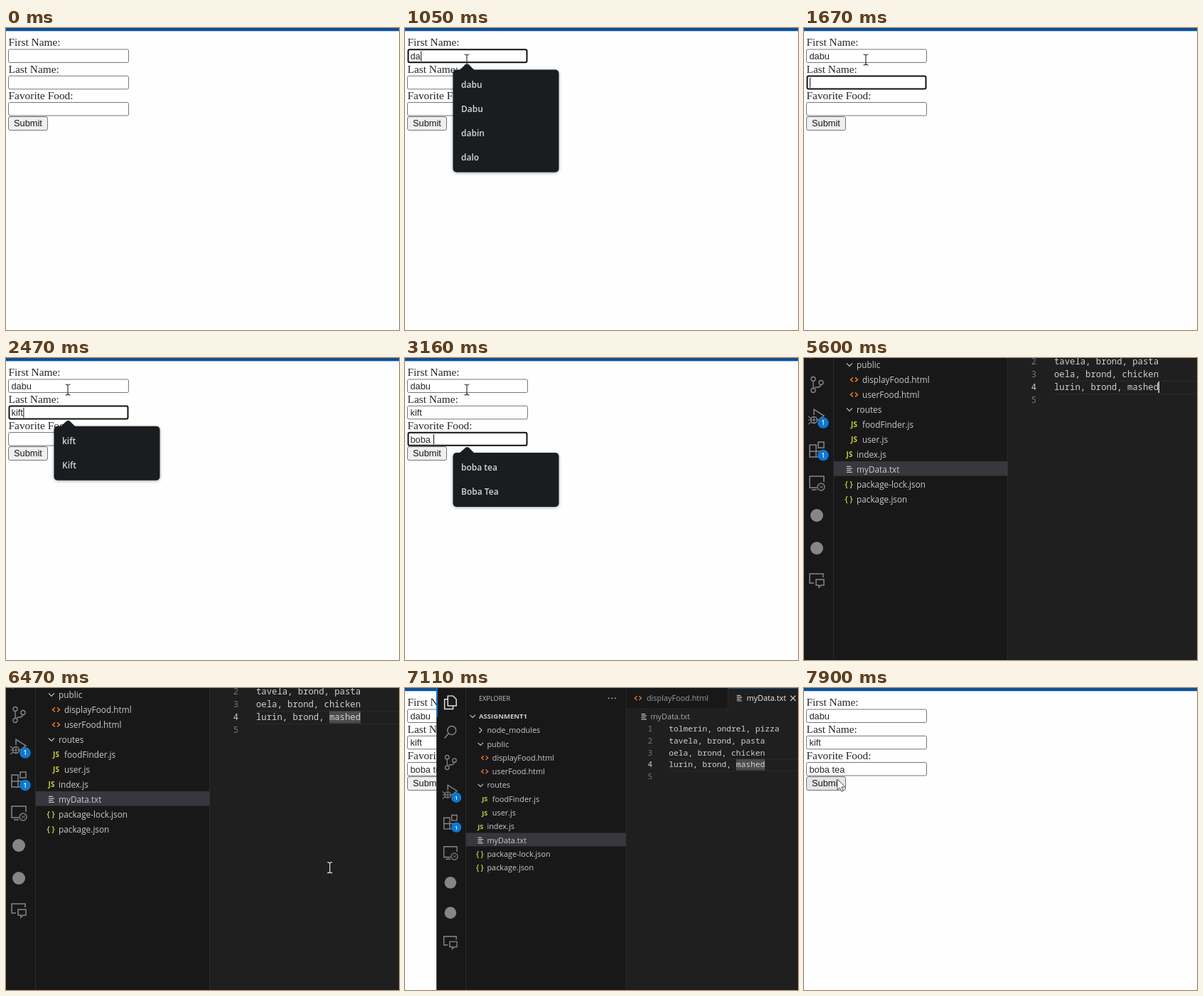
An HTML page with a canvas for the animation above (7.99 s loop, 553 by 424 pixels).

```html
<!DOCTYPE html>
<html lang="en">
<head>
<meta charset="utf-8">
<title>Form and data file</title>
<style>
  html, body { margin: 0; width: 100%; height: 100%; overflow: hidden; background: #fff; }
  canvas { display: block; width: 553px; height: 424px; }
</style>
</head>
<body>
<canvas id="stage" width="553" height="424"></canvas>
<script>
const ctx = document.getElementById('stage').getContext('2d');
const W = 553, H = 424, LOOP = 7990, STEP = LOOP / 102;
const SERIF = '15.4px "Liberation Serif", serif';
const ARIAL = '12.8px "Liberation Sans", sans-serif';
const MONO = '12.25px "Noto Sans Mono", monospace';
const ui = (size, weight = 400) => `${weight} ${size}px "Open Sans", sans-serif`;

// ---------- drawing helpers ----------
function text(str, x, y, font, color, align = 'left') {
  ctx.font = font;
  ctx.fillStyle = color;
  ctx.textAlign = align;
  ctx.fillText(str, x, y);
}
function rect(x, y, w, h, color) {
  ctx.fillStyle = color;
  ctx.fillRect(x, y, w, h);
}
function box(x, y, w, h, r, fill, stroke, line = 1) {
  ctx.beginPath();
  ctx.roundRect(x, y, w, h, r);
  if (fill) { ctx.fillStyle = fill; ctx.fill(); }
  if (stroke) { ctx.strokeStyle = stroke; ctx.lineWidth = line; ctx.stroke(); }
}
function disc(x, y, r, color) {
  ctx.beginPath();
  ctx.arc(x, y, r, 0, 7);
  ctx.fillStyle = color;
  ctx.fill();
}
function ring(x, y, r, color, line = 1.4) {
  ctx.beginPath();
  ctx.arc(x, y, r, 0, 7);
  ctx.strokeStyle = color;
  ctx.lineWidth = line;
  ctx.stroke();
}
function lines(x, y, path, color, width = 1.2) {
  ctx.save();
  ctx.translate(x, y);
  ctx.strokeStyle = color;
  ctx.lineWidth = width;
  ctx.stroke(new Path2D(path));
  ctx.restore();
}

// ---------- web form ----------
const fields = [
  { label: 'First Name:', y: 29.5, options: ['dabu', 'Dabu', 'dabin', 'dalo', 'demmi', 'Dorrin'] },
  { label: 'Last Name:', y: 66.8, options: ['kift', 'Kift', 'kintle', 'kemmo', 'karrun', 'Kolber'] },
  { label: 'Favorite Food:', y: 104, options: ['boba tea', 'Boba Tea', 'bolognese', 'bread', 'beans', 'Burger'] }
];
// [time, focused field, its text]
const typing = [
  [650, 0, ''], [890, 0, 'd'], [1050, 0, 'da'], [1200, 0, 'dab'], [1360, 0, 'dabu'],
  [1660, 1, ''], [1760, 1, 'k'], [1920, 1, 'ki'], [2220, 1, 'kif'], [2460, 1, 'kift'],
  [2690, 2, ''], [2850, 2, 'b'], [2930, 2, 'bo'], [3000, 2, 'bob'], [3080, 2, 'boba'],
  [3150, 2, 'boba '], [3320, 2, 'boba t'], [3470, 2, 'boba te'], [3630, 2, 'boba tea'],
  [4090, -1, '']
];

function formState(t) {
  const state = { values: ['', '', ''], focus: -1, since: 0 };
  for (const [at, field, value] of typing) {
    if (at > t) break;
    if (field >= 0) state.values[field] = value;
    state.focus = field;
    state.since = at;
  }
  return state;
}

function popup(field, typed) {
  const items = field.options.filter(o => o.toLowerCase().startsWith(typed));
  const top = field.y + 29, height = items.length * 34 + 8;
  ctx.save();
  ctx.shadowColor = 'rgba(0,0,0,.35)';
  ctx.shadowBlur = 4;
  ctx.shadowOffsetY = 1;
  box(67.5, top, 149, height, 5, '#1a1d20');
  ctx.restore();
  ctx.fillStyle = '#1a1d20';
  ctx.fill(new Path2D(`M76 ${top + 1}L85 ${top - 7}Q87.5 ${top - 9} 90 ${top - 7}L98 ${top + 1}Z`));
  items.forEach((item, i) => text(item, 79, top + 25 + i * 34, ui(12, 600), '#d4d6d8'));
}

function drawForm(t, mouse) {
  rect(0, 0, W, H, '#fefefe');
  rect(0, 0, W, 4, '#104f95');
  rect(0, 4, W, 1, '#a9c3de');
  const { values, focus, since } = formState(t);
  fields.forEach(({ label, y }, i) => {
    text(label, 3.5, y - 4.2, SERIF, '#262626');
    if (i === focus) box(4.5, y + .7, 167, 18, 2, '#fff', '#101010', 2);
    else box(3.5, y + .5, 169, 18.5, 2, '#fff', '#767676');
    text(values[i], 7.5, y + 14.6, ARIAL, '#262626');
    if (i === focus && (t - since) % 1000 < 500) {
      rect(8 + ctx.measureText(values[i]).width, y + 3, 1, 14, '#111');
    }
  });
  const hover = mouse && mouse.x < 59 && mouse.y > 124 && mouse.y < 144;
  box(3.5, 124.5, 55, 19, 2.5, hover ? '#e5e5e5' : '#efefef', '#767676');
  text('Submit', 11, 138.4, ARIAL, '#161616');
  if (focus >= 0 && values[focus]) popup(fields[focus], values[focus]);
}

// ---------- code editor ----------
const GREY = '#868686', YELLOW = '#cbcb41', ORANGE = '#e37933', BLUE = '#0e78d2';
const LABEL = ui(11.8);
const ROW = 21, LEFT = -3.4;
// [icon, depth, name], one row each
const files = [
  ['>', 0, 'node_modules'], ['v', 0, 'public'],
  ['<>', 1, 'displayFood.html'], ['<>', 1, 'userFood.html'],
  ['v', 0, 'routes'], ['JS', 1, 'foodFinder.js'], ['JS', 1, 'user.js'],
  ['JS', 0, 'index.js'], ['txt', 0, 'myData.txt'],
  ['{ }', 0, 'package-lock.json'], ['{ }', 0, 'package.json']
];
const data = [
  'tolmerin, ondrel, pizza', 'tavela, brond, pasta',
  'oela, brond, chicken', 'lurin, brond, mashed', ''
];

function fileIcon(kind, x, y) {
  if (kind === 'v') lines(x, y, 'M-4 -2L0 2L4 -2', '#c5c5c5');
  else if (kind === '>') lines(x, y, 'M-2 -4L2 0L-2 4', '#c5c5c5');
  else if (kind === '<>') lines(x, y, 'M-1.5 -3L-5 0L-1.5 3M1.5 -3L5 0L1.5 3', ORANGE, 1.4);
  else if (kind === 'txt') lines(x, y, 'M-4 -4H2M-4 -1.3H4M-4 1.3H2M-4 4H4', '#c0c4c8', 1.3);
  else if (kind === 'JS') text(kind, x, y + 3.8, ui(10, 700), YELLOW, 'center');
  else text(kind, x - 1, y + 3.8, ui(11.5, 600), YELLOW, 'center');
}

function badge(y) {
  disc(27, y, 7.8, BLUE);
  text('1', 27, y + 3.2, ui(8.5, 600), '#fff', 'center');
}

function drawActivityBar() {
  rect(LEFT, -78, 2, 46, BLUE);
  lines(18, -54, 'M-4 -10H4L9 -5V5H-4ZM-4 -5H-9V10H4V5', '#e0e0e0', 1.6);
  ring(20, -11.5, 6.5, GREY, 1.6);
  lines(18, -8.5, 'M-3 2L-9 9', GREY, 1.8);
  ring(13, 29.5, 3, GREY);
  ring(13, 45.5, 3, GREY);
  ring(24, 34.5, 3, GREY);
  lines(18, 37.5, 'M-5 -5V5M6 0Q5 4 -3 4', GREY, 1.4);
  lines(18, 83, 'M-4 -3V-11L10 -2L2 4', GREY, 1.5);
  ring(14, 87, 4.5, GREY);
  lines(14, 87, 'M-8 -5L-4 -2M-8 0H8M-8 6L-4 3M0 -4V4', GREY);
  badge(91);
  lines(18, 129, 'M-10 -7H-1V10H-10ZM-10 2H8V10H-1M2 -11H10V-3H2Z', GREY, 1.5);
  badge(136.5);
  lines(18, 175, 'M0 7H-10V-9H10V-1M-7 10H0', GREY, 1.5);
  ring(24, 181, 5, GREY);
  lines(24, 181, 'M-2 -2L0 0L-2 2M2 -2L1 0L2 2', GREY, 1);
  disc(18, 221, 9, GREY);
  disc(18, 267, 9, GREY);
  lines(18, 312, 'M-4 4H-10V-9H9V-4M-1 -1H10V7H6L3 10V7H-1Z', GREY, 1.5);
}

function drawSidebar() {
  text('EXPLORER', 61.5, -56.8, ui(10), '#c4c4c4');
  [260, 265, 270].forEach(x => disc(x, -60.5, 1, '#c4c4c4'));
  fileIcon('v', 52, -33);
  text('ASSIGNMENT1', 61.5, -29.2, ui(10.4, 700), '#cccccc');
  rect(42, 145, 244.5, 20.5, '#37373d');
  files.forEach(([icon, depth, name], i) => {
    const y = -11.6 + i * ROW;
    fileIcon(icon, depth ? 70.5 : 64, y);
    text(name, depth ? 82 : 74, y + 4.2, LABEL, '#cacaca');
  });
}

function drawEditor(t) {
  const selected = t >= 6240;
  rect(287, -78, 155, 33.5, '#181818');
  rect(287, -45, 155, 1, '#2b2b2b');
  rect(442, -78, 1, 33.5, '#2b2b2b');
  rect(442, -78, 114, 2.5, BLUE);
  rect(556, -78, 640, 33.5, '#181818');
  fileIcon('<>', 305, -60.5);
  text('displayFood.html', 318, -56.5, LABEL, '#9d9d9d');
  fileIcon('txt', 460, -60.5);
  text('myData.txt', 471, -56.5, LABEL, '#f0f0f0');
  lines(542, -60.5, 'M-4 -4L4 4M4 -4L-4 4', '#d0d0d0', 1.3);
  fileIcon('txt', 314, -32.3);
  text('myData.txt', 324, -28.2, LABEL, '#a9a9a9');
  rect(352, 32, 835, 1, '#2a2a2a');
  rect(352, 50, 835, 1, '#2a2a2a');
  if (selected) rect(455, 32.5, 44, 17, '#4c4c4c');
  data.forEach((row, i) => {
    const y = -9.7 + i * 18.25;
    text(i + 1, 327, y, MONO, i === 3 ? '#cccccc' : '#6e7681', 'right');
    text(row, 352, y, MONO, '#d0d0d0');
  });
  if (!selected && (t - 5440) % 1000 < 500) rect(498.5, 33, 1.5, 16, '#d8d8d8');
}

// The window grows from, and shrinks towards, the taskbar below the stage.
const windowPoses = [
  [5430, .72, .45], [5510, .94, .95], [5590, 1, 1],
  [7020, .985, 1], [7100, .92, 1], [7180, .74, .5], [7260, 0, 0]
];

function drawWindow(t) {
  const pose = windowPoses.filter(p => p[0] <= t).pop();
  if (!pose || !pose[2]) return;
  const [, scale, alpha] = pose;
  ctx.save();
  ctx.globalAlpha = alpha;
  ctx.translate(592, 875);
  ctx.scale(scale, scale);
  ctx.translate(-592, -875);
  rect(LEFT, -107, 1190, 930, '#181818');
  rect(287, -78, 900, 901, '#1f1f1f');
  rect(41, -78, 1, 901, '#2b2b2b');
  rect(286, -78, 1, 901, '#2b2b2b');
  drawActivityBar();
  drawSidebar();
  drawEditor(t);
  ctx.restore();
}

// ---------- mouse pointer ----------
// tracks of [time, x, y]; the pointer is off stage between tracks
const tracks = [
  [[80, 455, 256], [240, 365, 115], [400, 240, 60], [560, 87, 44], [3780, 87, 44],
   [4000, 42, 132], [4160, 42, 132], [4310, 262, 107], [4420, 305, 190], [4555, 440, 256]],
  [[5680, 395, 424], [6060, 478, 42], [6240, 478, 42], [6470, 450, 305],
   [6640, 450, 305], [6950, 600, -20]],
  [[7340, 560, -5], [7500, 320, 26], [7740, 62, 120], [7830, 47, 128], [LOOP, 47, 128]]
];

function mouseAt(t) {
  const track = tracks.find(k => t >= k[0][0] && t < k[k.length - 1][0]);
  if (!track) return null;
  const held = Math.max(track[0][0], Math.floor(t / STEP) * STEP);
  const i = track.findIndex(k => k[0] > held);
  const [t0, x0, y0] = track[i - 1], [t1, x1, y1] = track[i];
  const f = (held - t0) / (t1 - t0);
  return { x: x0 + (x1 - x0) * f, y: y0 + (y1 - y0) * f };
}

function drawMouse({ x, y }, t) {
  const inEditor = t > 5500 && t < 7000;
  const overText = inEditor ? x > 290 : x < 173 && fields.some(f => y > f.y && y < f.y + 19);
  if (overText) {
    lines(x, y, 'M-3.5 -7Q0 -7 0 -5Q0 -7 3.5 -7M0 -5V6M-3.5 8Q0 8 0 6Q0 8 3.5 8', inEditor ? '#ddd' : '#333', 1.2);
    return;
  }
  ctx.save();
  ctx.translate(x, y);
  const arrow = new Path2D('M0 0V15L3.4 12L5.8 17.5L8.2 16.5L5.8 11H10.8Z');
  ctx.fillStyle = '#fff';
  ctx.fill(arrow);
  ctx.strokeStyle = '#555';
  ctx.lineWidth = 1;
  ctx.stroke(arrow);
  ctx.restore();
}

function frame(now) {
  const t = now % LOOP;
  const mouse = mouseAt(t);
  drawForm(t, mouse);
  drawWindow(t);
  if (mouse) drawMouse(mouse, t);
  requestAnimationFrame(frame);
}
requestAnimationFrame(frame);
</script>
</body>
</html>
```
